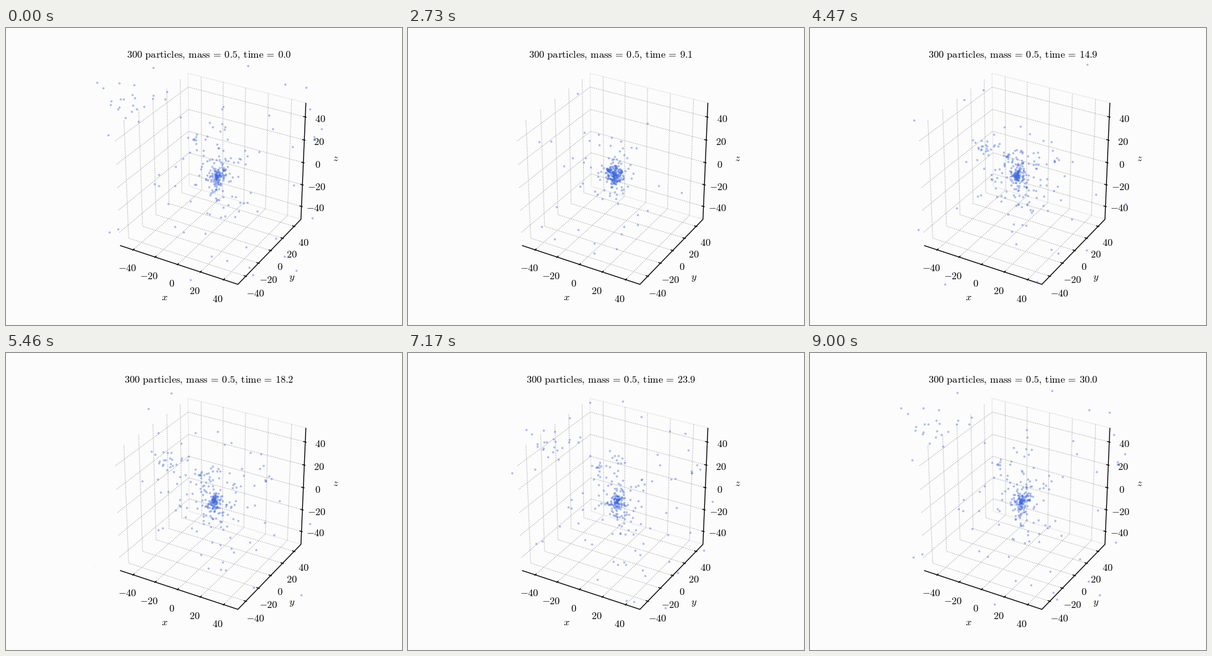
Recreate the animation shown at these times as a matplotlib script. Size 640 by 480 pixels, loop 9030 ms.

```python
import numpy as np
import matplotlib.pyplot as plt
from matplotlib.animation import FuncAnimation
from matplotlib.collections import LineCollection
from matplotlib.transforms import Bbox

plt.rcParams['mathtext.fontset'] = 'cm'

W, H, FRAMES, DT = 640, 480, 301, 0.1
N, T_END, T_BOUNCE = 300, 30.0, 8.3
SIDE, LEFT, BOTTOM = 369.6, 143.2, 52.8
L = 50 * 25 / 24                      # half width of the drawn cube
HUB = np.array([333.0, 237.4])        # cube centre on screen

fig = plt.figure(figsize=(W / 100, H / 100), dpi=100, facecolor='#fcfcfc')
ax = fig.add_axes([0, 0, 1, 1])
ax.set(xlim=(0, W), ylim=(H, 0))
ax.axis('off')


# ---- perspective box ----
def project(points):
    """Cube units to pixels, seen from elevation 30 and azimuth -60."""
    p = np.asarray(points, float) * 1.1003 / (2 * L)
    el, az = np.radians(30), np.radians(-60)
    eye = [np.cos(el) * np.cos(az), np.cos(el) * np.sin(az), np.sin(el)]
    right = [-np.sin(az), np.cos(az), 0]
    up = np.cross(eye, right)
    k = SIDE / 0.185 / (10 - p @ eye)
    return HUB + np.stack([k * (p @ right), -k * (p @ up)], axis=-1)


def lines(paths, **style):
    ax.add_collection(LineCollection([project(p) for p in paths], **style),
                      autolim=False)


def label(x, y, tex, **style):
    return ax.text(x, y, f'${tex}$', size=11.75, ha='center',
                   **{'va': 'center', **style})


lines([[(L, L, -L), (-L, L, -L), (-L, L, L), (L, L, L)]],
      colors='#ebebeb', linewidths=1, zorder=1)

grid, marks = [], []
IN, OUT = 1.8, 1.0
PAD = L + 11
for t in range(-40, 41, 20):
    grid += [[(t, -L, -L), (t, L, -L), (t, L, L)],
             [(L, t, -L), (-L, t, -L), (-L, t, L)],
             [(-L, -L, t), (-L, L, t), (L, L, t)]]
    marks += [[(t, -L + IN, -L), (t, -L - OUT, -L)],
              [(L - IN, t, -L), (L + OUT, t, -L)],
              [(L - IN, L, t), (L + OUT, L, t)]]
    for at, shift in (((t, -PAD, -PAD), (2.4, 0)),
                      ((PAD, t, -PAD), (-4.6, 1.6)),
                      ((PAD, PAD, t), (-7, 7.8))):
        label(*(project(at) + shift), t)

lines(grid, colors='#9c9c9c', linewidths=0.8, linestyles=':', zorder=2)
lines([[(-L, -L, -L), (L, -L, -L), (L, L, -L), (L, L, L)]] + marks,
      colors='black', linewidths=1, zorder=3)
for name, x, y in (('x', 256, 435.5), ('y', 462, 405), ('z', 533, 210.5)):
    label(x, y, name)


# ---- particles ----
rng = np.random.default_rng(12)


def polar(n, low, high):
    """Random directions with evenly spread distances."""
    a, r = rng.uniform(0, 2 * np.pi, n), rng.uniform(low, high, n)
    return np.stack([r * np.cos(a), r * np.sin(a)], axis=-1)


# thrown out at the bounce: all directions, plus a stream to the upper left
far = np.concatenate([polar(62, 50, 230),
                      rng.normal((-135, -120), (24, 22), (18, 2))])
far_pow = np.minimum(0.82, 0.0075 * np.hypot(*far.T))[:, None]

# fast escapers that leave during the collapse
early = polar(18, 70, 145)
early_t0 = 6 * np.sqrt(rng.random((len(early), 1)))

# small group that drifts away together
clump = (-29, -57) + rng.normal(0, 1, (12, 2)) * np.linspace(2, 17, 12)[:, None]

# bound core and halo on slow ellipses
n_core = N - len(far) - len(early) - len(clump)
radius = 14 * rng.lognormal(0, 0.85, (n_core, 1)).clip(0, 5)
axis_a, axis_b = rng.normal(0, (0.7, 0.95), (2, n_core, 2)) * radius
phase = rng.uniform(0, 2 * np.pi, (n_core, 1))
speed = 2.4 / np.sqrt(1 + radius / 6)

start = rng.normal(0, 24, (N, 2))
start[len(far):len(far) + len(early)] *= 0.3
t_fall = rng.uniform(7.7, 8.7, (N, 1))


def positions(t):
    fall = start * np.clip(1 - (t / t_fall) ** 2, 0, None) ** (2 / 3)
    tau = max(0, (t - T_BOUNCE) / (T_END - T_BOUNCE))

    fly = far * tau ** far_pow
    shot = early * (np.maximum(0, t - early_t0) / (9.1 - early_t0)) ** 0.75
    group = clump * (1 - (1 - tau) ** 2)

    # the core starts tight and relaxes, the halo is wide at once
    tight = radius / (radius + 12)
    size = tight + (1 - tight) * min(1, tau ** 0.4)
    size = size * np.clip((t - 7) / 1.6, 0, 1) ** 2
    turn = phase + speed * t
    core = (axis_a * np.cos(turn) + axis_b * np.sin(turn)) * size
    core = core + np.array([7, 2.5]) * tau
    return HUB + fall + np.concatenate([fly, shot, group, core])


dots = ax.scatter(*positions(0).T, s=6.8, c='royalblue', alpha=0.42,
                  linewidths=0, zorder=5)
dots.set_clip_box(Bbox.from_bounds(LEFT, BOTTOM, SIDE, SIDE))
title = label(328, 48, 'x', va='baseline')


def caption(t):
    s = f'{N} particles, mass = 0.5, time = {t:.1f}'
    s = s.replace(', ', r',\hspace{.18}')
    s = s.replace(' = ', r'\hspace{.18}=\hspace{.18}')
    return r'$\mathrm{%s}$' % s.replace(' ', r'\hspace{.38}')


def update(i):
    # the opening picture still holds the final state
    dots.set_offsets(positions((i or FRAMES) * DT))
    title.set_text(caption(i * DT))
    return dots, title


anim = FuncAnimation(fig, update, frames=FRAMES, interval=30)
plt.show()
```
